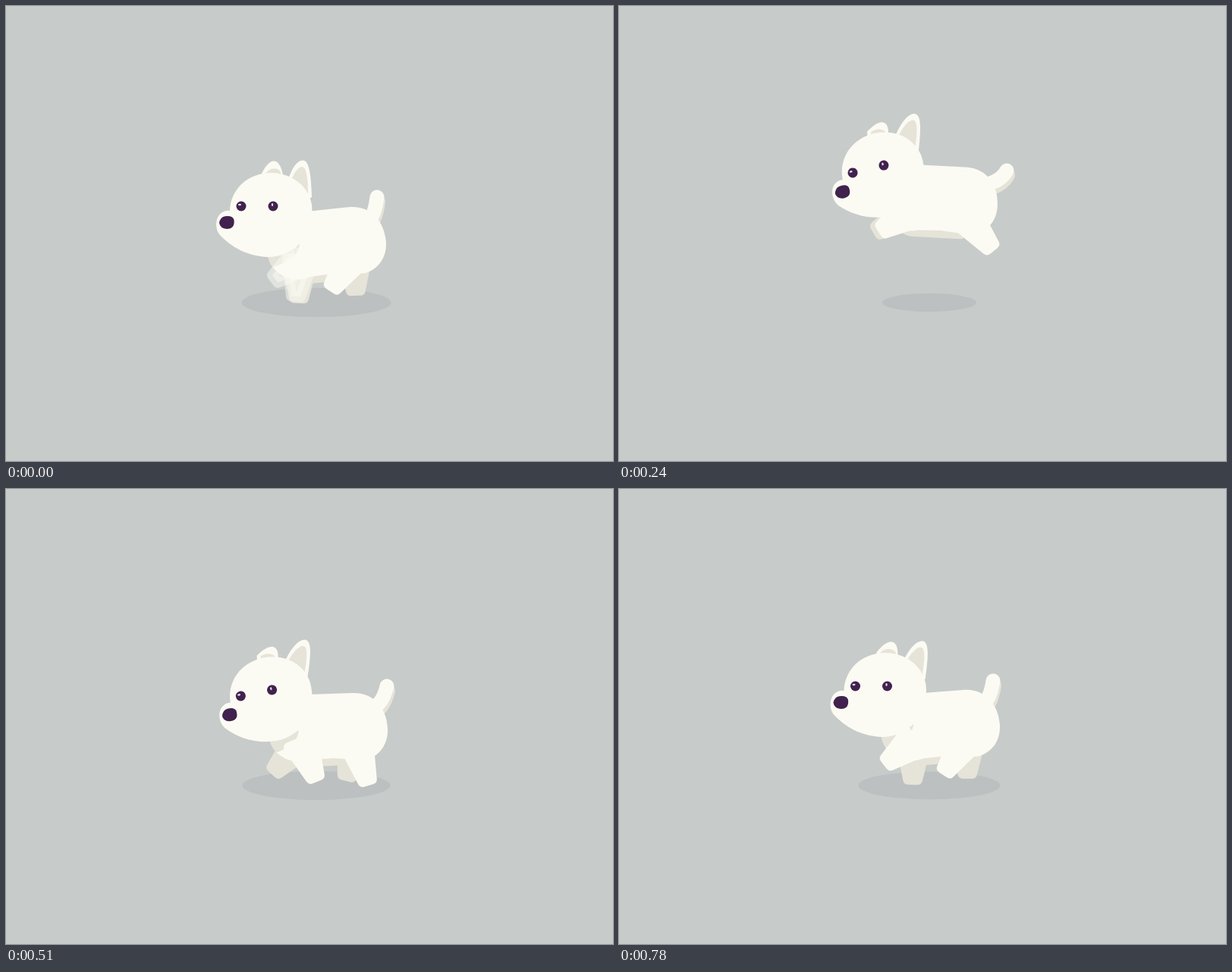
An HTML page with a canvas for the animation above (810 ms loop, 800 by 600 pixels).

```html
<!DOCTYPE html>
<html lang="en">
<head>
<meta charset="utf-8">
<title>Running puppy</title>
<style>
  html, body { margin: 0; width: 100%; height: 100%; overflow: hidden; background: #c7cbca; }
  canvas { display: block; width: 800px; height: 600px; }
</style>
</head>
<body>
<canvas id="stage" width="800" height="600"></canvas>
<script>
const ctx = document.getElementById('stage').getContext('2d');
const LOOP = 810, STEP = 30;
const BG = '#c7cbca', FUR = '#fbfbf3', SHADE = '#e6e3d8', INK = '#41224f', GROUND = '#bcc0c0';
const RAD = Math.PI / 180;

// Key poses share one set of times; each row is one pose.
const TIMES = [0, 120, 240, 390, 510, 660, 780];
const HEAD = [ // eye midpoint x, y, tilt, ear flap
  [331, 264, 0, 0], [334, 240, 0, 30], [328.5, 215, -13.5, 22], [321.5, 263, -24.8, 5],
  [330, 269, -11, 22], [336, 237, 0, 30], [332.5, 260, 0, 10]];
const BODY = [ // centre x, y, tilt, ground shadow radius
  [428, 316, -6, 98.5], [422, 297, 8, 80], [426, 259, 3, 62], [426, 295, -7, 86.5],
  [430, 318, -2, 97.5], [430, 295, 0, 67.5], [429, 315, -4.5, 93.5]];
const TAIL = [[489, 252], [509, 261], [511, 217], [503, 239], [502, 260], [507, 243], [493, 253]];
const FEET = {
  nearFront: [[381, 390], [334, 309], [342, 298], [380, 371], [410, 386], [391, 363], [349, 364]],
  farFront: [[386, 392], [334, 336], [335, 299], [338, 341], [350, 376], [402, 361], [387, 390]],
  nearBack: [[427, 376], [438, 377], [494, 323], [501, 347], [478, 391], [425, 357], [427, 377]],
  farBack: [[461, 382], [471, 358], [480, 312], [482, 335], [448, 385], [422, 348], [459, 382]]
};
const LAST_STRIDE = FEET.nearFront[6];

const SHAPES = {
  torso: 'M-60-48L28-48C58-48 73-25 73 1C73 22 60 38 40 41L0 37L-30 38C-60 46-84 26-84 2Q-84-30-60-48Z',
  belly: 'M-55 15L35 15L32 44Q30 47 26 47L-40 47Q-52 45-55 36Z',
  collar: 'M8 50L56 50Q53 63 47 68Q34 77 18 81Q10 72 8 50Z',
  skull: 'M295 270C296 242 318 220 350 220C378 221 399 238 403 262C407 300 382 331 345 331' +
         'C318 330 297 318 282 302C275 294 275 277 286 271.5Q290 269 295 270Z',
  ear: 'M369 240C373 220 382 203.5 391 203.5C400 203.5 402 224 403 252L388 262Z',
  earInner: 'M373 238C378 221 385 212 390 212C397 212 398 232 398 252L386 258Z',
  farEar: 'M336 223C341 212 347 204.5 353 204.5C359 204.5 363 212 365 223L362 236L342 236Z',
  farInner: 'M341 222C346 215 351 214 356 214.5Q361 215 363 222L360 232L346 232Z',
  nose: 'M283 281Q285 277 292 277Q299 277 300.5 282Q302 294 291 294Q282 293 281 286Q281 283 283 281Z'
};
const paths = Object.fromEntries(Object.entries(SHAPES).map(([k, d]) => [k, new Path2D(d)]));

function slope(rows, i, k) {
  const d = j => (rows[j + 1][k] - rows[j][k]) / (TIMES[j + 1] - TIMES[j]);
  if (i === 0) return 0;
  if (i === TIMES.length - 1) return d(i - 1);
  const a = TIMES[i] - TIMES[i - 1], b = TIMES[i + 1] - TIMES[i];
  return (d(i - 1) * b + d(i) * a) / (a + b);
}

// Smooth Hermite interpolation of a whole row.
function sample(rows, t) {
  let i = TIMES.length - 2;
  while (i > 0 && t < TIMES[i]) i--;
  const h = TIMES[i + 1] - TIMES[i], u = Math.min(1, (t - TIMES[i]) / h);
  const v = 1 - u;
  return rows[i].map((p, k) =>
    v * v * (1 + 2 * u) * p + u * u * (3 - 2 * u) * rows[i + 1][k] +
    h * u * v * (v * slope(rows, i, k) - u * slope(rows, i + 1, k)));
}

function fill(path, color) {
  ctx.fillStyle = color;
  ctx.fill(path);
}

function within(x, y, deg, draw) {
  ctx.save();
  ctx.translate(x, y);
  ctx.rotate(deg * RAD);
  draw();
  ctx.restore();
}

function oval(x, y, rx, ry, color) {
  ctx.fillStyle = color;
  ctx.beginPath();
  ctx.ellipse(x, y, rx, ry, 0, 0, 7);
  ctx.fill();
}

function onBody([x, y, deg], lx, ly) {
  const c = Math.cos(deg * RAD), s = Math.sin(deg * RAD);
  return [x + lx * c - ly * s, y + lx * s + ly * c];
}

// Tapered limb with a rounded paw.
function leg([hx, hy], [fx, fy], color) {
  const r = 7, len = Math.hypot(fx - hx, fy - hy) || 1;
  const ux = (fx - hx) / len, uy = (fy - hy) / len;
  const ex = fx - ux * r, ey = fy - uy * r;
  ctx.beginPath();
  ctx.moveTo(hx - uy * 17, hy + ux * 17);
  ctx.lineTo(ex - uy * 6, ey + ux * 6);
  ctx.lineTo(ex + uy * 6, ey - ux * 6);
  ctx.lineTo(hx + uy * 17, hy - ux * 17);
  ctx.closePath();
  ctx.fillStyle = ctx.strokeStyle = color;
  ctx.lineWidth = 2 * r;
  ctx.lineJoin = 'round';
  ctx.fill();
  ctx.stroke();
}

function tail([bx, by], [tx, ty]) {
  const stroke = (dx, dy, color) => {
    ctx.beginPath();
    ctx.moveTo(bx + dx, by + dy);
    ctx.quadraticCurveTo(bx + (tx - bx) * .75 + dx, by + (ty - by) * .2 + dy, tx + dx, ty + dy);
    ctx.strokeStyle = color;
    ctx.lineWidth = 19;
    ctx.lineCap = 'round';
    ctx.stroke();
  };
  stroke(1.5, 6, SHADE);
  stroke(0, 0, FUR);
}

function flap(px, py, deg, outer, inner) {
  within(px, py, deg, () => {
    ctx.translate(-px, -py);
    fill(outer, FUR);
    fill(inner, SHADE);
  });
}

function head([x, y, tilt, ear]) {
  within(x, y, tilt, () => {
    ctx.translate(-331, -264);
    flap(351, 228, ear * 1.45, paths.farEar, paths.farInner);
    flap(389, 249, ear, paths.ear, paths.earInner);
    fill(paths.skull, FUR);
    fill(paths.nose, INK);
    oval(310, 264, 6.5, 6.5, INK);
    oval(352, 264, 6.5, 6.5, INK);
    oval(308, 262, 2, 1.3, '#e4dde6');
    oval(351, 262, 1.2, 2, '#e4dde6');
  });
}

function draw(t) {
  const h = sample(HEAD, t), b = sample(BODY, t);
  const front = onBody(b, -42, 15), back = onBody(b, 30, 15);
  const foot = name => sample(FEET[name], t);

  ctx.fillStyle = BG;
  ctx.fillRect(0, 0, 800, 600);
  oval(409, 391, b[3], b[3] * .195, GROUND);

  leg(front, foot('farFront'), SHADE);
  leg(back, foot('farBack'), SHADE);
  tail(onBody(b, 50, -25), sample(TAIL, t));

  within(b[0], b[1], b[2], () => {
    fill(paths.belly, SHADE);
    fill(paths.torso, FUR);
  });
  ctx.save();
  ctx.translate(b[0], b[1]);
  ctx.rotate(b[2] * RAD);
  ctx.clip(paths.torso);
  ctx.rotate(-b[2] * RAD);
  ctx.translate(h[0] - b[0], h[1] - b[1]);
  fill(paths.collar, SHADE);
  ctx.restore();

  // The near front leg changes stride with a one-step cross-fade.
  if (t < STEP) {
    ctx.save();
    const layer = (tip, alpha) => {
      const [hx, hy] = front;
      ctx.globalAlpha = alpha;
      leg([hx, hy], tip, FUR);
    };
    layer(LAST_STRIDE, .5);
    layer(foot('nearFront'), .5);
    ctx.restore();
  } else {
    leg(front, foot('nearFront'), FUR);
  }
  leg(back, foot('nearBack'), FUR);
  head(h);
}

function tick() {
  draw(Math.floor(performance.now() % LOOP / STEP) * STEP);
  requestAnimationFrame(tick);
}
tick();
</script>
</body>
</html>
```
